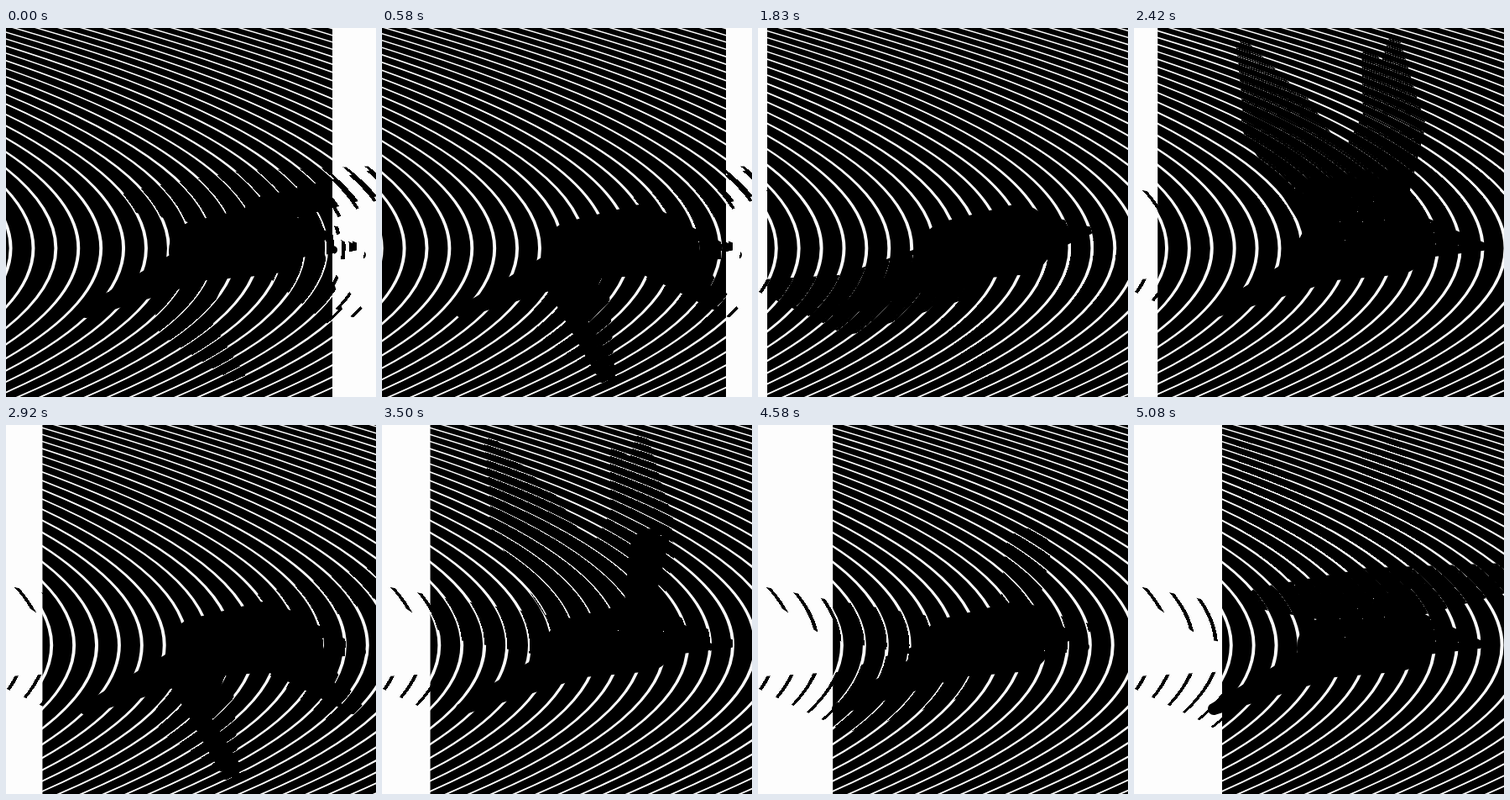
Write an HTML page that moves like this. It is 441 px wide and 439 px high and loops after 5.25 s.

```html
<!DOCTYPE html>
<html lang="en">
<head>
<meta charset="utf-8">
<title>Barrier grid bird</title>
<style>
html, body { margin: 0; width: 100%; height: 100%; overflow: hidden; background: #fdfdfd; }
svg { display: block; width: 100vw; height: 100vh; }
</style>
</head>
<body>
<svg id="stage" viewBox="0 0 441 439">
  <defs id="defs">
    <clipPath id="sheet"><rect width="448" height="439"/></clipPath>
  </defs>
  <rect width="441" height="439" fill="#fdfdfd"/>
  <g id="picture" shape-rendering="crispEdges"></g>
  <g id="grid"><g clip-path="url(#sheet)"><path id="bands"/></g></g>
</svg>
<script>
const LOOP = 5250, STEP = 1000 / 12, LAST = 62;
const PERIOD = 26.9, AXIS = 262, BEND = 0.0066, FLARE = 1e-5;
const SLIT = 3.9, SLIT_START = 10.8, FIRST_STRIP = 7.9;
const TOP = -5, BOTTOM = 445;

// Limbs are chains of joints: x, y, radius.
const body = [[230, 265, 36], [310, 252, 42]];
const tail = [[225, 280, 24], [95, 338, 7]];
const head = (x, y) => [[325, 247, 30], [x, y, 5]];

// One wing beat: level, up, forward, sweeping, down, closing.
const poses = [
  [head(412, 261), [[150, 206, 13], [280, 206, 36], [441, 182, 18]]],
  [head(416, 260), [[240, 215, 45], [172, 110, 44], [131, 24, 9]],
    [[275, 205, 50], [309, 115, 38], [310, 18, 8]], [[309, 115, 38], [280, 34, 9]]],
  [head(390, 264), [[250, 260, 25], [90, 232, 23], [10, 199, 6]], [[310, 220, 22], [322, 150, 27]]],
  [head(394, 241), [[240, 285, 38], [110, 328, 36], [0, 306, 7]]],
  [head(424, 270), [[230, 290, 40], [268, 415, 10]], [[330, 265, 34], [418, 338, 8]]],
  [head(396, 240), [[225, 295, 35], [208, 345, 30], [278, 416, 8]],
    [[330, 255, 45], [392, 344, 12]], [[310, 230, 30], [441, 186, 18]]]
];

// Sheet offset by step; it pauses once near the middle and once at the end.
const path = [[0, -59], [7, -38], [13, -15.5], [22, 11], [29, 28.2], [36, 46],
  [37, 46], [50, 76], [61, 105], [LAST, 105]];

const $ = id => document.getElementById(id);

function add(parent, tag, attrs) {
  const el = document.createElementNS('http://www.w3.org/2000/svg', tag);
  for (const name in attrs) el.setAttribute(name, attrs[name]);
  return parent.appendChild(el);
}

function addLimb(parent, joints) {
  joints.forEach(([x, y, r], i) => {
    add(parent, 'circle', { cx: x, cy: y, r });
    if (!i) return;
    const [px, py, pr] = joints[i - 1];
    const len = Math.hypot(x - px, y - py);
    const nx = (py - y) / len, ny = (x - px) / len;
    const corner = (cx, cy, w) => `${cx + nx * w},${cy + ny * w}`;
    add(parent, 'polygon', {
      points: [corner(px, py, pr), corner(x, y, r), corner(x, y, -r), corner(px, py, -pr)].join(' ')
    });
  });
}

// Area between two parabolas with apexes a and b.
function strip(a, bendA, b, bendB) {
  const mid = (TOP + BOTTOM) / 2;
  const x = (apex, bend, y) => (apex - bend * (y - AXIS) ** 2).toFixed(2);
  const ctrl = (apex, bend) => (apex - bend * (TOP - AXIS) * (BOTTOM - AXIS)).toFixed(2);
  return `M${x(a, bendA, TOP)},${TOP}Q${ctrl(a, bendA)},${mid} ${x(a, bendA, BOTTOM)},${BOTTOM}` +
    `L${x(b, bendB, BOTTOM)},${BOTTOM}Q${ctrl(b, bendB)},${mid} ${x(b, bendB, TOP)},${TOP}Z`;
}

function repeat(from, to, make) {
  let d = '';
  for (let i = from; i < to; i++) d += make(i * PERIOD);
  return d;
}

function build() {
  const pitch = PERIOD / poses.length, half = pitch / 2 + 0.05;
  poses.forEach((limbs, j) => {
    const clip = add($('defs'), 'clipPath', { id: 'pose' + j });
    [body, tail, ...limbs].forEach(limb => addLimb(clip, limb));
    const c = FIRST_STRIP + j * pitch;
    add($('picture'), 'path', {
      d: repeat(-1, 36, x => strip(x + c - half, BEND, x + c + half, BEND)),
      'clip-path': `url(#pose${j})`
    });
  });
  $('bands').setAttribute('d', repeat(-2, 37, x => strip(
    x + SLIT_START + SLIT / 2, BEND - FLARE,
    x + SLIT_START + PERIOD - SLIT / 2, BEND + FLARE)));
}

function offset(step) {
  const i = Math.max(1, path.findIndex(p => p[0] >= step));
  const [k0, x0] = path[i - 1], [k1, x1] = path[i];
  return x0 + (x1 - x0) * (step - k0) / (k1 - k0);
}

function draw(ms) {
  const step = Math.min(LAST, Math.floor((ms % LOOP + 4) / STEP));
  $('grid').setAttribute('transform', `translate(${offset(step).toFixed(2)} 0)`);
}

build();
draw(0);
let start;
requestAnimationFrame(function tick(now) {
  start ??= now;
  draw(now - start);
  requestAnimationFrame(tick);
});
</script>
</body>
</html>
```
